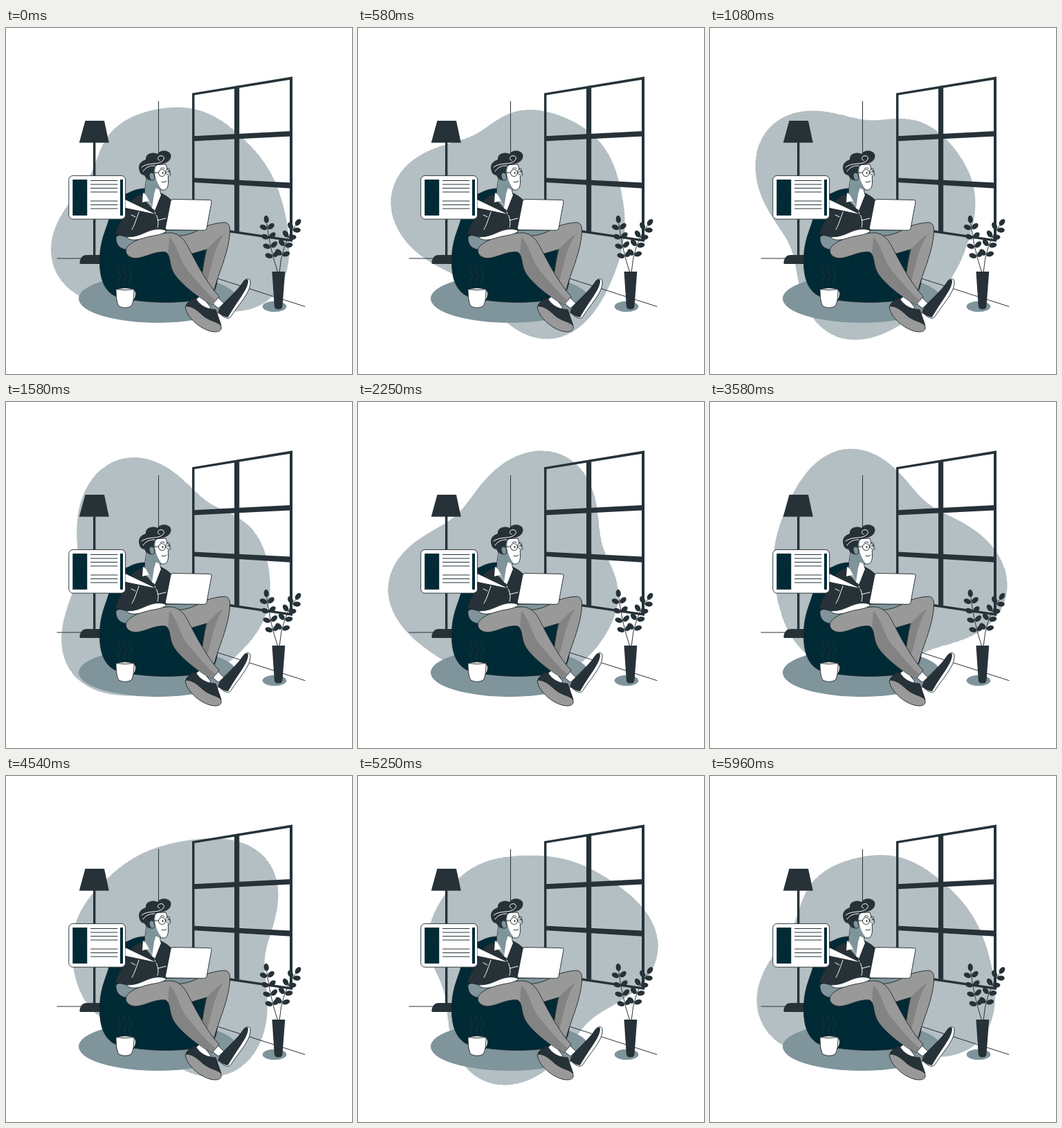
An HTML page for the animation above (6 s loop, 500 by 500 pixels).

```html
<!DOCTYPE html>
<html lang="en">
<head>
<meta charset="utf-8">
<title>Reading at home</title>
<style>
  html, body { margin: 0; width: 100%; height: 100%; overflow: hidden; background: #fff; }
  svg { display: block; width: 100vw; height: 100vh; }
  #blob { transform-origin: 238.5px 258.5px; }
  .dark { fill: #263238; }
  .teal { fill: #002a36; }
  .mist { fill: #7f949b; }
  .white { fill: #fff; }
  .grey { fill: #999; }
  .shade { fill: #838383; }
  .line { fill: none; stroke: #263238; stroke-width: 1; stroke-linecap: round; stroke-linejoin: round; }
  .edge { stroke: #1c262b; stroke-width: .9; stroke-linejoin: round; }
  .chalk { fill: none; stroke: #fff; stroke-width: 1; stroke-linecap: round; }
</style>
</head>
<body>
<svg viewBox="0 0 500 500" xmlns="http://www.w3.org/2000/svg">
  <g id="blob">
    <path class="teal"/>
    <path class="white" opacity=".7"/>
  </g>

  <!-- room -->
  <path class="line" d="M220.5 106V190M74 333H140M304 361.5L432 402.5"/>
  <ellipse class="mist" cx="219" cy="391" rx="114" ry="35"/>

  <!-- window -->
  <g class="dark">
    <path d="M269 94.2L414 70.2V309L269 287.5ZM272.4 97V284.5L410 305V74.7Z" fill-rule="evenodd"/>
    <path d="M330 84.5L337.2 83.2V297L330 296Z"/>
    <path d="M270 156.2L412 149V156.4L270 163.4Z"/>
    <path d="M270 216.4L412 223.4V231.8L270 223Z"/>
  </g>

  <!-- lamp -->
  <g class="dark">
    <path d="M114.5 134H142L148.8 165.8H105.8Z"/>
    <rect x="126" y="165" width="3.4" height="166"/>
    <path d="M108 341Q106 341 106.500 338C108 331 111 328 117 328H140V341Z"/>
  </g>

  <!-- plant -->
  <ellipse class="mist" cx="388" cy="402.5" rx="17.3" ry="7.8"/>
  <g id="plant"></g>
  <path class="dark" d="M384.5 352H403.3L399.5 402Q399 406.5 393.5 406.5Q388.3 406.5 387.8 402Z"/>

  <!-- beanbag -->
  <path class="teal edge" d="M178 238C188 232 205 230 216 234L300 320C306 342 311 375 294 388C265 399 205 399 162 389C144 383 135.5 365 135.5 338C135.5 305 145 293 150 272C154 255 163 243 178 238Z"/>

  <!-- far leg -->
  <path class="grey edge" d="M236 301C266 296 296 281 316 281C325 282 324.5 292 322 308C318 332 308 352 301 378L284 378L290 320L256 330Z"/>
  <path class="shade" d="M289 321C298 312 307 302 314 299C301 318 298 340 291 366L283 360Z"/>
  <path class="line" d="M290 320Q285 338 282 362" stroke-width=".7"/>

  <!-- far shoe -->
  <path class="white edge" d="M273 393L282 386L296 404L290 412Z"/>
  <path class="dark edge" d="M260 401C263 395 269 391 274 390.5C280 402 292 407 303 407L311 430C292 426 270 412 260 401Z"/>
  <path class="grey edge" d="M259 402C267 401 276 407 284 415C293 423 304 424 310 429C314 437 307 440.5 297 438.5C280 435 260 417 259 402Z"/>

  <!-- hips and near leg -->
  <path class="mist edge" d="M159 302C163 298 180 296 200 292L278 292C266 299 250 302 236 300L181 321C168 321 158 316 159 302Z"/>
  <path class="white edge" d="M294 395L304 387L315 398L307 405Z"/>
  <path class="grey edge" d="M174 318C183 305 214 297 236 296C251 296 258 306 265 320C277 343 290 368 308 388L298 400C283 393 257 373 244 356C235 343 239 329 231 324C214 321 196 336 182 332C174 329 172 324 174 318Z"/>
  <path class="shade" d="M236 302C250 316 250 338 266 354C277 368 290 382 303 394L298 400C281 391 256 373 244 356C236 343 239 331 234 325Z"/>

  <!-- near shoe -->
  <path class="white edge" d="M307 411C310 400 330 387 343 367C347 361 353 361 353 367C354 381 338 397 325 417C321 422 315 419 307 411Z"/>
  <path class="dark" d="M306.500 411C308 399 329 387 343 366C346 362 350 362 350 366C349 379 334 395 321 418C316 418 311 415 306.500 411Z"/>

  <!-- torso -->
  <path class="dark edge" d="M198 240C185 242 177 252 171 269C165 281 160 290 158 298L184 304L228 292C238 283 241 262 239 249C233 243 226 239 221 238Z"/>
  <path class="white edge" d="M203 216L199 247L213 263L224 242L221 226Z"/>
  <path class="mist" d="M203 216L200 247L211 260L214 240L217 230L212 222Z"/>
  <path class="white" d="M198 238L197 252L206 250L215 264L224 241L220 237L213 261L202 241Z"/>
  <path class="white edge" d="M174 302C186 302 193 299 200 296C213 290 224 289 232 293C226 300 213 299 201 303C190 307 178 308 174 302Z"/>
  <path class="chalk" d="M192 266C188 277 186 284 182 291M215 266C220 275 221 281 219 288M187 273L181 270M219 278L231 275" stroke-width=".9"/>

  <!-- laptop -->
  <path class="white edge" d="M241 247.5L294.5 248.5Q297.5 248.5 297 251.5L290 289.5Q289.5 292.3 286.5 292.3L234 291.8Q229.5 292 230.5 288L238 250Q238.5 247.5 241 247.5Z"/>

  <!-- head -->
  <path class="white edge" d="M208 198L231 197L233 204L238 211Q238 214 234.3 214L234.5 223C234.5 231 231 235 226 234C217 232 210 227 208 219Z"/>
  <path class="mist" d="M208 201L216 202C214 212 217 223 225 233.5C216 232 209 227 207 219Z"/>
  <path class="dark" d="M193 207C190 198 194 193 202 190C201 182 211 178 219 182C223 175 237 176 238.5 184C239 192 231 196 222 197C216 198 213 203 214 211L211 220C206 221 202 217 200 213Q194 212 193 207Z"/>
  <path class="mist edge" d="M214 211C209 206 205 211 208 217C209 221 213 221 215 218Z"/>
  <path class="chalk" d="M196 201C205 194 218 198 225 193C231 189 228 183 222 185C218 187 219 191 222 191M198 207C203 200 209 199 215 199"/>
  <g class="line">
    <circle cx="225.5" cy="209.5" r="5"/>
    <ellipse cx="234" cy="207.5" rx="2.8" ry="4.5"/>
    <path d="M213 209H220.5M223 203Q227 201 229 203M225 222.5Q229 224 232 221.5"/>
  </g>
  <ellipse class="dark" cx="226.5" cy="209.5" rx=".9" ry="1.7"/>
  <ellipse class="dark" cx="234" cy="208" rx=".7" ry="1.5"/>

  <!-- tablet callout -->
  <path class="white edge" d="M171 247L219 270L171 260Z"/>
  <rect class="white edge" x="90.8" y="213.4" width="81.8" height="62.8" rx="6"/>
  <path class="white" d="M169 248.4L172.5 248.5V259.7H169Z"/>
  <rect class="teal" x="96.3" y="219" width="21" height="52"/>
  <rect class="teal" x="165" y="219" width="4" height="52"/>
  <path class="line" d="M98 262L114 226" stroke-width=".5" opacity=".6"/>
  <path class="line" d="M122.5 220.5H161m-38.5 5.5h38.5m-38.5 5.5h38.5m-38.5 5.5h38.5m-38.5 13h38.5m-38.5 5.5h38.5m-38.5 5.5h38.5"/>

  <!-- mug -->
  <path class="line" d="M164 372q-4 -5 0 -9t0 -9t0 -9m8 27q-4 -5 0 -9t0 -9t0 -9m8 27q-4 -5 0 -9t0 -9t0 -9"/>
  <path class="white edge" d="M183 379C189 377 189 391 182 395L182 391C185 388 185 384 183 383Z"/>
  <path class="white edge" d="M159 377.5Q172 374 185 377.5C185 388 184 397 181 402Q172 406.5 163 402C160 397 159 388 159 377.5Z"/>
  <path class="line" d="M159 377.5Q172 380 185 377.5"/>
</svg>
<script>
  const LOOP = 6000, CX = 238.5, CY = 258.5;

  // The blob is a circle with a few waves around it: [waves, height, phase].
  const waves = [[1, 16.7, .454], [2, 8.6, -1.686], [3, 19.6, -.614], [4, 8.9, .664], [6, 2.3, .35]];
  const radius = a => waves.reduce((r, [n, h, p]) => r + h * Math.cos(n * a - p), 155.7);

  const STEPS = 180;
  const outline = Array.from({ length: STEPS }, (_, i) => {
    const a = i * 2 * Math.PI / STEPS, r = radius(a);
    return `${(CX + r * Math.cos(a)).toFixed(2)} ${(CY + r * Math.sin(a)).toFixed(2)}`;
  });

  const blob = document.getElementById('blob');
  for (const path of blob.children) path.setAttribute('d', `M${outline.join('L')}Z`);
  blob.animate(
    [{ transform: 'rotate(42deg)' }, { transform: 'rotate(402deg)' }],
    { duration: LOOP, iterations: Infinity, easing: 'linear' }
  );

  const leaf = (x, y, angle) =>
    `<ellipse class="dark" cx="6.5" rx="5.5" ry="3.6" transform="translate(${x} ${y}) rotate(${angle})"/>`;

  // A stem bent through its control point, with leaf pairs below a single tip leaf.
  function branch(root, bend, tip) {
    const at = t => [0, 1].map(k =>
      (1 - t) ** 2 * root[k] + 2 * t * (1 - t) * bend[k] + t * t * tip[k]);
    const heading = t => {
      const [dx, dy] = [0, 1].map(k => (1 - t) * (bend[k] - root[k]) + t * (tip[k] - bend[k]));
      return Math.atan2(dy, dx) * 180 / Math.PI;
    };
    let svg = `<path class="line" d="M${root}Q${bend} ${tip}"/>` + leaf(...tip, heading(1));
    for (let t = .32; t < .95; t += .19)
      for (const side of [-1, 1]) svg += leaf(...at(t), heading(t) + side * 58);
    return svg;
  }

  document.getElementById('plant').innerHTML =
    branch([393, 354], [381, 318], [377, 283]) + branch([395, 354], [398, 312], [418, 286]);
</script>
</body>
</html>
```
